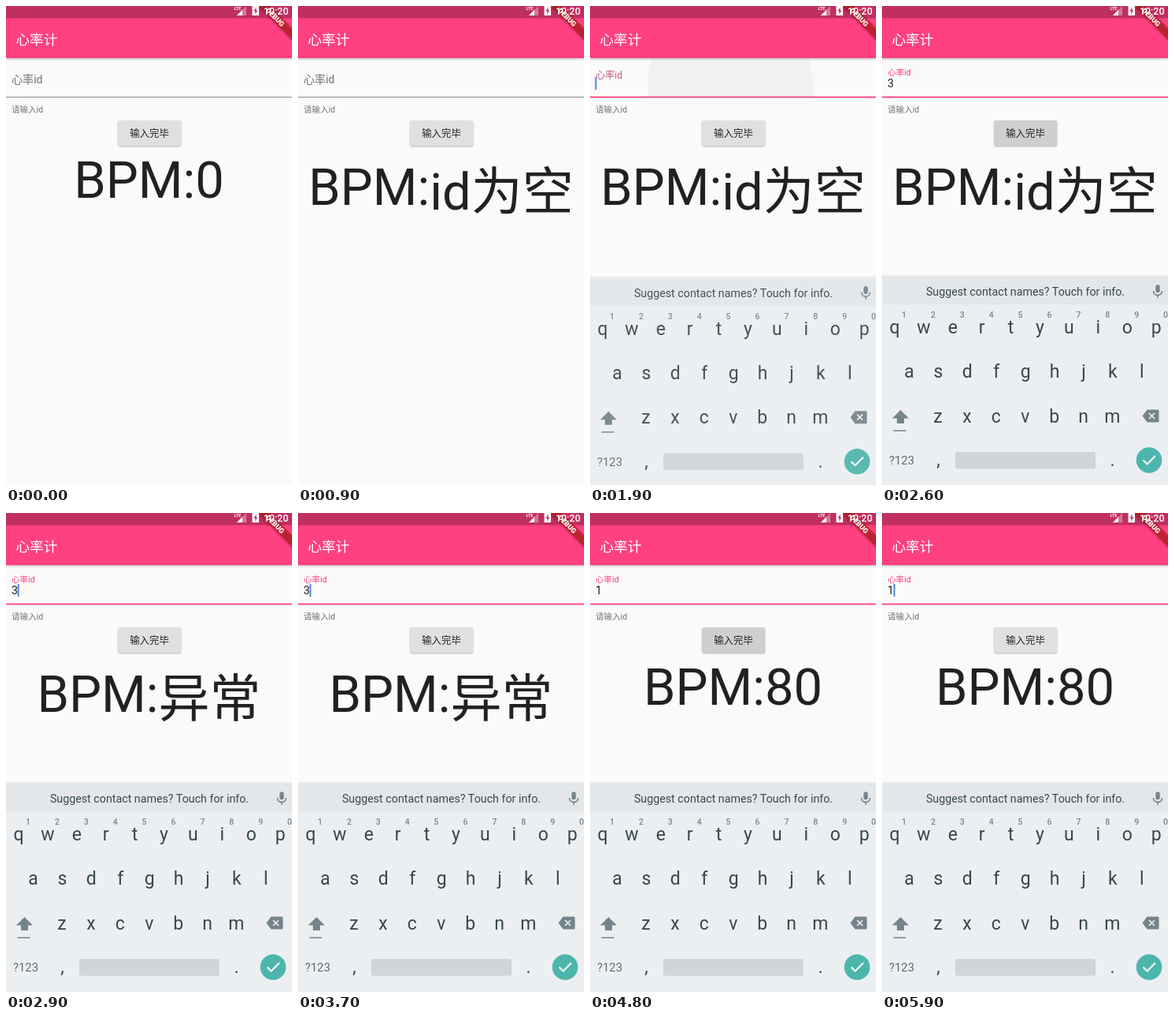
These frames come from a looping animation (363x607 px, 6.2 s). An HTML page:

```html
<!DOCTYPE html>
<html lang="zh-CN">
<head>
<meta charset="utf-8">
<title>心率计</title>
<style>
html, body { margin: 0; height: 100%; overflow: hidden; background: #fafafa; }
svg { display: block; width: 100vw; height: 100vh; font-family: Roboto, "Noto Sans CJK SC", "Noto Sans CJK", sans-serif; }
.bar { filter: drop-shadow(0 1.5px 1.5px rgba(0,0,0,.3)); }
.btn { filter: drop-shadow(0 1px 1px rgba(0,0,0,.3)); }
.mid { text-anchor: middle; }
.key { font-size: 23px; fill: #37474f; text-anchor: middle; }
.hint { font-size: 10.5px; font-weight: 500; fill: #78878e; text-anchor: middle; }
</style>
</head>
<body>
<svg viewBox="0 0 363 607">
  <defs>
    <clipPath id="field"><rect y="66" width="363" height="49"/></clipPath>
    <linearGradient id="edge" x2="0" y2="1">
      <stop stop-color="#f0f1f2"/><stop offset="1" stop-color="#dde1e3"/>
    </linearGradient>
  </defs>
  <rect width="363" height="607" fill="#fafafa"/>

  <circle id="splash" cx="178" cy="100" r="105" fill="#f1f1f1" clip-path="url(#field)"/>
  <rect id="line" width="363"/>
  <text id="label" x="7">心率id</text>
  <text id="value" x="7" y="103" font-size="14.1" fill="#212121"></text>
  <rect id="caret" y="90" width="2" height="16" fill="#4f83e0"/>
  <text x="7" y="135" font-size="10.6" fill="#737373">请输入id</text>

  <rect id="button" class="btn" x="142.5" y="145" width="79.5" height="32" rx="2"/>
  <text class="mid" x="182" y="165.5" font-size="12.4" fill="#212121">输入完毕</text>
  <text id="bpm" class="mid" x="181.5" font-size="65" fill="#212121">BPM:<tspan id="rate"></tspan></text>

  <rect class="bar" y="10" width="363" height="56" fill="#ff4081"/>
  <rect width="363" height="15.5" fill="#bf3061"/>
  <text x="12.5" y="48.5" font-size="17.6" fill="#fff">心率计</text>
  <g transform="translate(363 -7) rotate(45)">
    <rect class="btn" x="-36" y="24.7" width="72" height="10.6" fill="#b71c1c" fill-opacity=".7"/>
    <text class="mid" y="33.2" font-size="9" font-weight="900" fill="#fff">DEBUG</text>
  </g>
  <g fill="#fff">
    <text x="289.5" y="5" font-size="5.5" font-weight="700">LTE</text>
    <path d="M305 0V12H293Z" opacity=".35"/>
    <path d="M300 5V12H293Z"/>
    <path d="M312.500 0H321V12H312.500Z"/>
    <path d="M317.500 1.500L314.500 6.500H316.300V10.500L319.300 5.500H317.500Z" fill="#bf3061"/>
    <text x="327" y="10.500" font-size="12.4" font-weight="500">10:20</text>
  </g>

  <g id="keyboard">
    <rect y="341" width="363" height="3" fill="url(#edge)"/>
    <rect y="344" width="363" height="263" fill="#eceff1"/>
    <rect y="344" width="363" height="34.500" fill="#e4e7e9"/>
    <text class="mid" x="182" y="367" font-size="14.250" fill="#37474f">Suggest contact names? Touch for info.</text>
    <g fill="none" stroke="#75848b" stroke-width="1.600">
      <path d="M350 356V360.500" stroke-width="5.400" stroke-linecap="round"/>
      <path d="M344.500 361C344.500 368.200 355.500 368.200 355.500 361M350 366.500V370"/>
    </g>
    <g fill="#75848b">
      <path d="M23.500 512L34 522.500H28V529H19V522.500H13Z"/>
      <rect x="14.500" y="537.500" width="16" height="1.500"/>
      <path d="M336.500 511.500H350Q351.500 511.500 351.500 513V526Q351.500 527.500 350 527.500H336.500L330.500 519.500Z"/>
    </g>
    <path d="M339 516L346 523M346 516L339 523" stroke="#eceff1" stroke-width="1.700"/>
    <text x="9" y="581" font-size="14.800" fill="#5f6c73">?123</text>
    <rect x="93" y="565" width="178" height="21.500" rx="2.500" fill="#cfd5d8"/>
    <circle cx="339" cy="575.500" r="16.300" fill="#4db6ac"/>
    <path d="M331.500 575.500L336.500 580.500L347 570" fill="none" stroke="#fff" stroke-width="2"/>
  </g>
</svg>
<script>
const $ = id => document.getElementById(id);
const set = (id, attrs) => {
  for (const k in attrs) $(id).setAttribute(k, attrs[k]);
};

function addKey(cls, char, x, y) {
  const el = document.createElementNS("http://www.w3.org/2000/svg", "text");
  el.setAttribute("class", cls);
  el.setAttribute("x", x);
  el.setAttribute("y", y);
  el.textContent = char;
  $("keyboard").append(el);
}
function addRow(cls, chars, x, y) {
  [...chars].forEach((c, i) => addKey(cls, c, x + 36.9 * i, y));
}
addRow("key", "qwertyuiop", 16, 415);
addRow("key", "asdfghjkl", 34.5, 471);
addRow("key", "zxcvbnm", 71, 527.5);
addRow("hint", "1234567890", 28, 395);
addKey("key", ",", 71.5, 583);
addKey("key", ".", 292.5, 583);

// Each list holds [start ms, state] pairs; the last one begun applies.
const tracks = {
  rate: [[0, "0"], [900, "id为空"], [2900, "异常"], [4800, "80"]],
  value: [[0, ""], [2000, "3"], [4000, ""], [4100, "1"]],
  caret: [[0, 0], [1800, 1], [2300, 0], [2900, 1], [3200, 0], [3700, 1],
          [4500, 0], [5000, 1], [5500, 0], [5900, 1]],
  button: [[0, 224], [2400, 216], [2500, 210], [2600, 207], [2900, 224],
           [4700, 212], [4800, 207], [4900, 216], [5000, 224]],
  float: [[0, 0], [1800, .08], [1900, .56], [2000, 1]],
  splash: [[0, 0], [1800, 40], [1900, 105], [2000, 0]],
  slide: [[0, 26], [1800, 10], [1900, 1.7], [2000, 0]],
  fade: [[0, 0], [1800, .4], [1900, .93], [2000, 1]]
};
const at = (name, t) => tracks[name].findLast(s => s[0] <= t)[1];
const mix = (a, b, p) => a + (b - a) * p;

function draw(t) {
  const rate = at("rate", t), value = at("value", t);
  const p = at("float", t), grey = at("button", t);
  const focused = t >= 1800, tall = /[^\x00-\x7f]/.test(rate);

  $("rate").textContent = rate;
  set("rate", { dy: tall ? 6 : 0 });
  set("bpm", { y: tall ? 252 : 242.7 });
  $("value").textContent = value;
  set("caret", { x: value ? 14.6 : 6.4, opacity: at("caret", t) });
  set("button", { fill: `rgb(${grey},${grey},${grey})` });
  set("label", {
    y: mix(97.5, 88, p),
    "font-size": mix(14.1, 10.6, p),
    fill: `rgb(${mix(115, 255, p)},${mix(115, 64, p)},${mix(115, 129, p)})`
  });
  set("line", {
    y: focused ? 114.6 : 115,
    height: focused ? 1.8 : 1,
    fill: focused ? "#ff4081" : "#8c8c8c"
  });
  set("splash", { r: at("splash", t) });
  set("keyboard", { transform: `translate(0 ${at("slide", t)})`, opacity: at("fade", t) });
}

const start = performance.now();
function tick() {
  draw((performance.now() - start) % 6200);
  requestAnimationFrame(tick);
}
tick();
</script>
</body>
</html>
```
